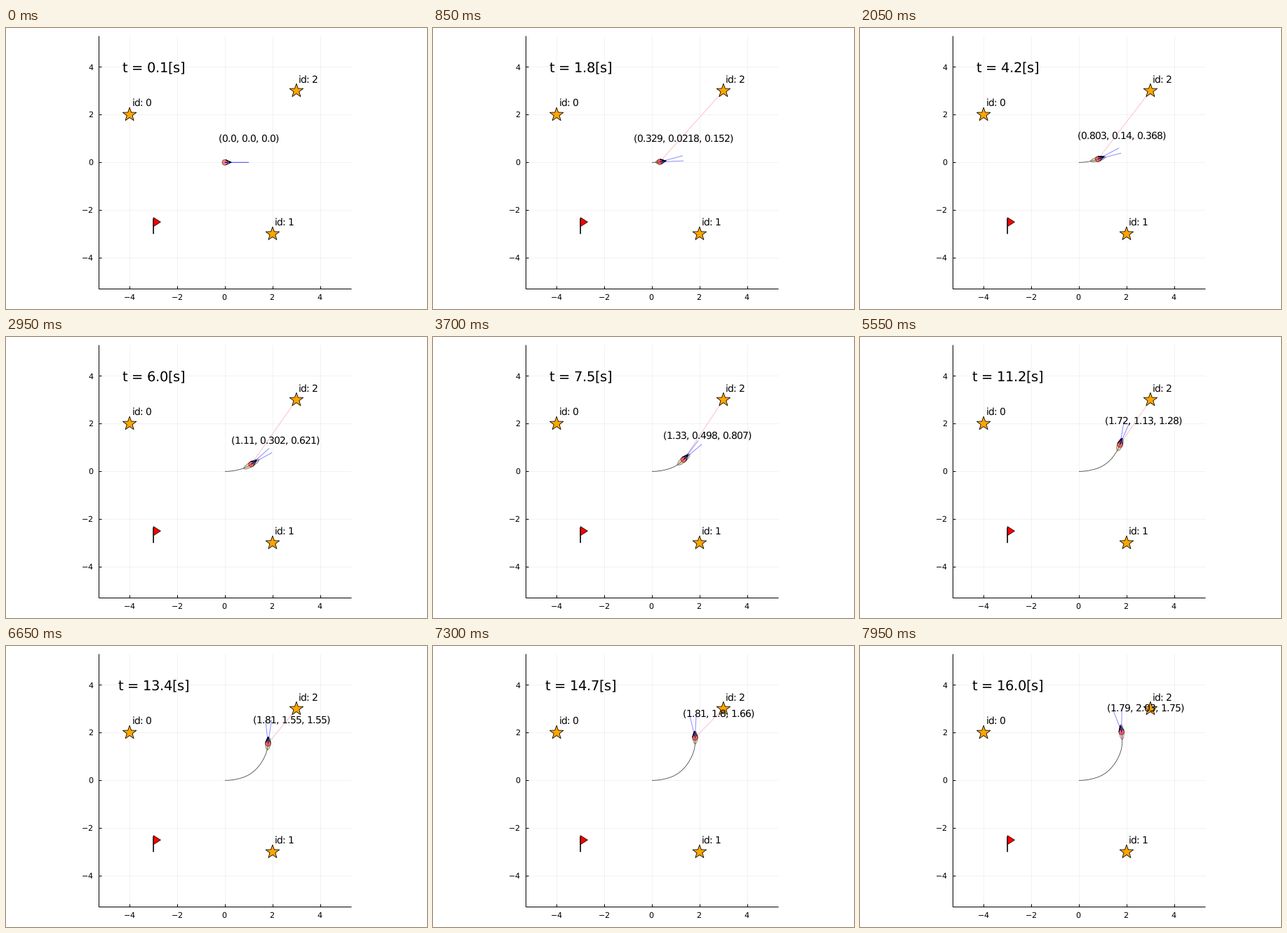
Recreate the animation shown at these times as a matplotlib script. Size 600 by 400 pixels, loop 8000 ms.

```python
import math

import matplotlib.pyplot as plt
import numpy as np
from matplotlib.animation import FuncAnimation
from matplotlib.patches import Circle, Ellipse, PathPatch, Polygon
from matplotlib.path import Path
from matplotlib.textpath import TextPath

W, H, DPI = 600, 400, 100
FRAMES, INTERVAL = 160, 50
LEFT, TOP, SIDE = 132, 11.3, 360
UNIT = SIDE / 10.6
PX = 72 / DPI            # one pixel in points
FONT = "DejaVu Sans"
TITLE, NOTE, TICK = (pt / PX for pt in (14, 10, 8))
LANDMARKS = [(-4, 2), (2, -3), (3, 3)]
FOV = math.pi / 3
# fill of the uncertainty ellipse by number of landmarks in view
ELLIPSE_COLORS = ["#ED5E93", "#C68225", "#00A98D", "#8E971E"]

# pose at a few moments: time, x, y, heading, turn rate, speed
KEYS = np.array([
    (0.0, 0.0, 0.0, 0.0, 0.02, 0.200),
    (1.7, 0.329, 0.0218, 0.152, 0.090, 0.197),
    (4.1, 0.803, 0.140, 0.368, 0.115, 0.200),
    (5.9, 1.110, 0.302, 0.621, 0.130, 0.195),
    (8.9, 1.520, 0.733, 0.989, 0.125, 0.198),
    (13.3, 1.810, 1.550, 1.550, 0.105, 0.195),
    (15.9, 1.790, 2.030, 1.750, 0.060, 0.180),
])
# heading spread (rad) and ellipse half axes (px) over time
SPREAD_T = [0, 0.3, 1.7, 4.1, 5.9, 8.9, 13.3, 15.2, 15.9]
SPREAD = [0, 0.06, 0.11, 0.118, 0.106, 0.11, 0.13, 0.15, 0.19]
MAJOR = [0, 2, 6, 11, 12.5, 10, 9, 9, 10.5]
MINOR = [0, 1, 2.5, 3, 3.4, 3.8, 3.5, 3.2, 3.2]


def px(x, y):
    return LEFT + SIDE / 2 + x * UNIT, TOP + SIDE / 2 - y * UNIT


def hermite(s, dt, p0, p1, m0, m1):
    return ((2 * s**3 - 3 * s**2 + 1) * p0 + (s**3 - 2 * s**2 + s) * dt * m0
            + (3 * s**2 - 2 * s**3) * p1 + (s**3 - s**2) * dt * m1)


def pose(t):
    i = min(int(np.searchsorted(KEYS[:, 0], t, side="right")) - 1, len(KEYS) - 2)
    a, b = KEYS[i], KEYS[i + 1]
    dt = b[0] - a[0]
    s = (t - a[0]) / dt
    x = hermite(s, dt, a[1], b[1], a[5] * math.cos(a[3]), b[5] * math.cos(b[3]))
    y = hermite(s, dt, a[2], b[2], a[5] * math.sin(a[3]), b[5] * math.sin(b[3]))
    return x, y, hermite(s, dt, a[3], b[3], a[4], b[4])


POSES = [pose(k / 10) for k in range(FRAMES)]
TRAIL = np.array([px(x, y) for x, y, _ in POSES])


def number(v):
    """Three significant digits, always with a decimal point."""
    text = repr(float(f"{v:.3g}")).replace("e-0", "e-")
    if "e" in text and "." not in text:
        text = text.replace("e", ".0e")
    return text


glyphs = {}


def glyph(c):
    if c not in glyphs:
        bar = TextPath((0, 0), "|", size=100, prop=FONT).get_extents().x1
        end = TextPath((0, 0), c + "|", size=100, prop=FONT).get_extents().x1
        shape = None if c == " " else TextPath((0, 0), c, size=100, prop=FONT)
        glyphs[c] = shape, (end - bar) / 100
    return glyphs[c]


def text_path(x, y, text, size, align=0.5):
    """Outline of a line of text; letters advance by whole pixels."""
    steps = [math.floor(glyph(c)[1] * size) for c in text]
    x = round(x - align * sum(steps))
    base = round(y + 0.365 * size)
    verts, codes = [], []
    for c, step in zip(text, steps):
        shape = glyph(c)[0]
        if shape is not None:
            verts.append(shape.vertices * (size / 100, -size / 100) + (x, base))
            codes.append(shape.codes)
        x += step
    return Path(np.concatenate(verts), np.concatenate(codes))


fig = plt.figure(figsize=(W / DPI, H / DPI), dpi=DPI, facecolor="white")
ax = fig.add_axes([0, 0, 1, 1])
ax.set_xlim(0, W)
ax.set_ylim(H, 0)
ax.axis("off")


def line(xs, ys, color, width=1.0, z=1, **kw):
    return ax.plot(xs, ys, color=color, lw=width * PX, zorder=z,
                   solid_capstyle="butt", **kw)[0]


def label(x, y, text, size, align=0.5):
    patch = PathPatch(text_path(x, y, text, size, align), fc="black", lw=0, zorder=10)
    return ax.add_patch(patch)


def draw_axes():
    right, bottom = LEFT + SIDE, TOP + SIDE
    for v in range(-4, 5, 2):
        x, y = px(v, v)
        line([x, x], [TOP, bottom], "black", 0.7, 0, alpha=0.07)
        line([LEFT, right], [y, y], "black", 0.7, 0, alpha=0.07)
        line([x, x], [bottom, bottom - 4], "black")
        line([LEFT, LEFT + 4], [y, y], "black")
        name = str(v).replace("-", "\u2212")
        label(x, 383, name, TICK)
        label(124.5, y, name, TICK, 1)
    line([LEFT, LEFT, right], [TOP, bottom, bottom], "black",
         solid_joinstyle="miter")


def draw_star(x, y, r=10.3):
    pts = []
    for i in range(10):
        a = -math.pi / 2 + i * math.pi / 5
        q = r if i % 2 == 0 else r * 0.4
        pts.append((x + q * math.cos(a), y + q * math.sin(a)))
    ax.add_patch(Polygon(pts, fc="orange", ec="black", lw=0.8 * PX, zorder=4))


def draw_flag(x, y):
    line([x, x], [y, y - 22], "black", 1.6, 3, snap=False)
    ax.add_patch(Polygon([(x, y - 23.5), (x + 10.3, y - 17), (x, y - 10.5)],
                         fc="red", ec="black", lw=0.7 * PX, zorder=4))


draw_axes()
for i, (lx, ly) in enumerate(LANDMARKS):
    draw_star(*px(lx, ly))
    label(*px(lx + 0.5, ly + 0.5), f"id: {i}", NOTE)
draw_flag(*px(-3, -3))

clock = label(*px(-3, 4), "t = 0.1[s]", TITLE)
readout = label(*px(1, 1), "(0.0, 0.0, 0.0)", NOTE)
trail = line([], [], "black", 0.8, 2, alpha=0.75, snap=False)
sights = [line([], [], "pink", 1, 3, snap=False) for _ in LANDMARKS]
ellipse = ax.add_patch(Ellipse((0, 0), 1, 1, lw=0.8 * PX, zorder=5))
body = ax.add_patch(Circle((0, 0), 4, fc=(1, 0, 0, 0.5), ec=(0, 0, 0, 0.5),
                           lw=0.9 * PX, zorder=6))
arrow = line([], [], "black", 1, 7, solid_joinstyle="round", snap=False)
bounds = [line([], [], "blue", 0.9, 8, alpha=0.5, snap=False) for _ in range(2)]


def visible(x, y, heading, mark):
    dx, dy = mark[0] - x, mark[1] - y
    return (0.5 <= math.hypot(dx, dy) <= 6
            and abs(math.atan2(dy, dx) - heading) <= FOV)


def update(k):
    t = k / 10
    x, y, heading = POSES[k]
    cx, cy = px(x, y)

    clock.set_path(text_path(*px(-3, 4), f"t = {(k + 1) / 10:.1f}[s]", TITLE))
    values = ", ".join(number(v) for v in POSES[k])
    readout.set_path(text_path(*px(x + 1, y + 1), f"({values})", NOTE))
    trail.set_data(TRAIL[:k + 1, 0], TRAIL[:k + 1, 1])

    seen = 0
    for sight, mark in zip(sights, LANDMARKS):
        if k > 0 and visible(x, y, heading, mark):
            mx, my = px(*mark)
            sight.set_data([cx, mx], [cy, my])
            seen += 1
        else:
            sight.set_data([], [])

    ellipse.set_center((cx, cy))
    ellipse.set_width(2 * np.interp(t, SPREAD_T, MAJOR))
    ellipse.set_height(2 * np.interp(t, SPREAD_T, MINOR))
    ellipse.set_angle(-math.degrees(heading - 0.08))
    ellipse.set_facecolor((ELLIPSE_COLORS[seen], 0.3))
    ellipse.set_edgecolor((0, 0, 0, 0.5 if k else 0))
    body.set_center((cx, cy))

    c, s = math.cos(heading), math.sin(heading)
    shape = [(0, 0), (9, 0), (1.5, 3.4), (9, 0), (1.5, -3.4)]
    arrow.set_data([cx + a * c - b * s for a, b in shape],
                   [cy - a * s - b * c for a, b in shape])

    spread = np.interp(t, SPREAD_T, SPREAD)
    for bound, sign in zip(bounds, (-1, 1)):
        a = heading + sign * spread
        bound.set_data([cx, cx + UNIT * math.cos(a)], [cy, cy - UNIT * math.sin(a)])
    return [clock, readout, trail, *sights, ellipse, body, arrow, *bounds]


anim = FuncAnimation(fig, update, frames=FRAMES, interval=INTERVAL,
                     init_func=lambda: update(0), repeat=True, repeat_delay=0)
plt.show()
```
